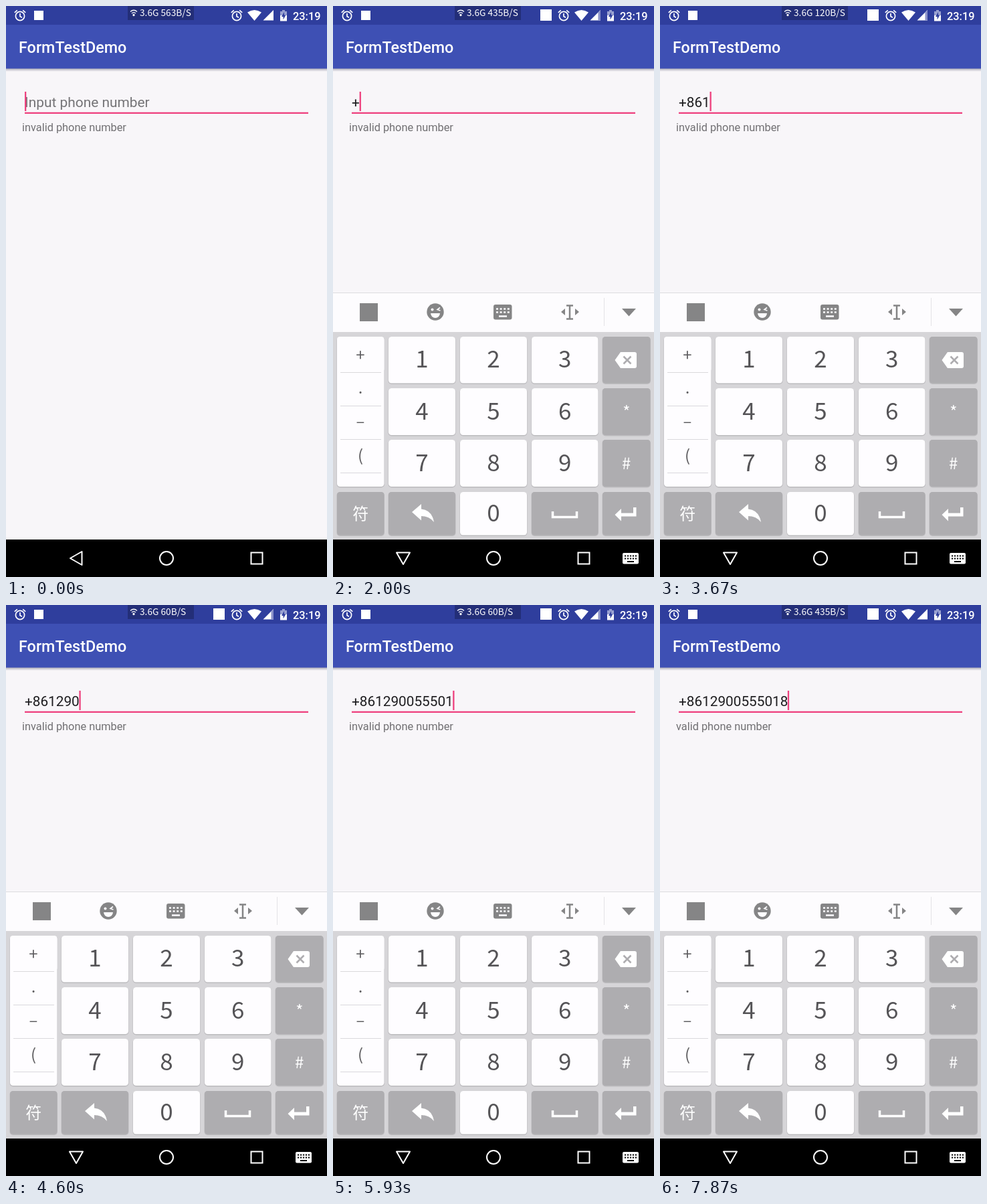
Recreate the animation shown at these times as an HTML page. Size 480 by 853 pixels, loop 8000 ms.

```html
<!DOCTYPE html>
<html lang="en">
<head>
<meta charset="utf-8">
<title>Phone number form</title>
<style>
  html, body { margin: 0; width: 100%; height: 100%; overflow: hidden; background: #000; }
  svg { display: block; width: 100%; height: 100%; font-family: Roboto, sans-serif; }
  .cjk { font-family: "Noto Sans CJK SC", "Noto Sans CJK JP", "Noto Sans CJK", "Noto Sans", sans-serif; }
  .white { fill: #fff; }
  .line { fill: none; stroke: #fff; stroke-width: 2; }
  .accent { fill: #ee427f; }
  .icon { fill: #858586; }
  .shade { fill: #bcbbbe; }
  .light { fill: #fefdff; }
  .light.down { fill: #e2e1e4; }
  .gray { fill: #aeadb0; }
  .gray.down { fill: #97969a; }
  .digit { font-size: 35px; fill: #555457; text-anchor: middle; }
  .sign { font-size: 24px; fill: #5e5d60; text-anchor: middle; }
  .sign.white { fill: #fff; }
</style>
</head>
<body>
<svg viewBox="0 0 480 853" preserveAspectRatio="none">
  <defs>
    <linearGradient id="shadow" x2="0" y2="1">
      <stop stop-color="#a9a8b4"/><stop offset="1" stop-color="#f8f6f9"/>
    </linearGradient>
    <g id="alarm" fill="none" stroke="#fff" stroke-width="1.7">
      <circle cy="1" r="6.6"/>
      <path d="M0-3V1.5L3 3.3M-8.2-4.2L-4.2-7.6M8.2-4.2L4.2-7.6"/>
    </g>
  </defs>

  <rect width="480" height="853" fill="#f8f6f9"/>
  <rect y="93" width="480" height="5" fill="url(#shadow)"/>
  <rect y="28" width="480" height="65.5" fill="#3e50b4"/>
  <rect width="480" height="28" fill="#2f3e9d"/>
  <text x="19" y="70" font-size="23.35" font-weight="500" class="white">FormTestDemo</text>

  <!-- status bar -->
  <use href="#alarm" x="21" y="14"/>
  <rect x="42" y="7" width="14" height="14" fill="#fff"/>
  <rect x="182" width="99" height="21" fill="#232e78"/>
  <g fill="none" stroke="#fff" stroke-width="1.3">
    <path d="M186 8.5Q191 4 196 8.5M188 11Q191 8.3 194 11"/>
    <circle cx="191" cy="13.5" r="1"/>
  </g>
  <text id="speed" x="200" y="15" font-size="13.7" class="cjk white"></text>
  <rect id="imeMark" x="310" y="5" width="17" height="17" fill="#fff"/>
  <use href="#alarm" x="345" y="14"/>
  <path class="white" d="M361 9.5Q371.500 2.500 382 9.500L371.500 22Z"/>
  <path class="white" d="M384.500 21.500L400 6V21.500Z"/>
  <path id="weak" fill="#8a92c9" d="M396.500 9.500L400 6V21.500H396.500Z"/>
  <path fill="#98a0d0" d="M410 8H413V6H417V8H420V15H410Z"/>
  <path class="white" d="M410 14H420V22.500H410Z"/>
  <path fill="#2f3e9d" d="M416 9L412 16H414.600V20.500L418.400 13.500H416Z"/>
  <text x="429" y="20.500" font-size="16.35" font-weight="500" class="white">23:19</text>

  <!-- form -->
  <text id="hint" x="28" y="151" font-size="20.9" fill="#757477">Input phone number</text>
  <text id="value" x="28" y="151" font-size="20.75" fill="#1f1e21"></text>
  <rect id="cursor" class="accent" y="128" width="2.3" height="29"/>
  <rect class="accent" x="28" y="158.700" width="424" height="2.300"/>
  <text id="status" x="24" y="187" font-size="16.35" fill="#717073"></text>

  <!-- soft keyboard -->
  <g id="keyboard">
    <rect y="428" width="480" height="369" fill="#d6d5d8"/>
    <rect y="428" width="480" height="59" fill="#fdfcfe"/>
    <rect y="428" width="480" height="1" fill="#dddcdf"/>
    <g class="icon">
      <rect x="40" y="444" width="27" height="27"/>
      <circle cx="153" cy="457" r="12.700"/>
      <rect x="240" y="446" width="27.500" height="22.500" rx="3"/>
      <path d="M432 452H453L442.500 463.500Z"/>
      <path d="M341 457L347 452V462ZM368 457L362 452V462Z"/>
    </g>
    <path d="M349 447.500H359M349 467.500H359M354 447.500V467.500" fill="none" stroke="#858586" stroke-width="2.500"/>
    <circle cx="148.500" cy="453.500" r="2" class="light"/>
    <path d="M146 459H160Q159 466 153 466T146 459Z" class="light"/>
    <path d="M160 450.500L156 453.500L160.500 455" fill="none" stroke="#fefdff" stroke-width="1.600"/>
    <path d="M244 452.500H264M244 457.500H264" stroke="#fefdff" stroke-width="2.500" stroke-dasharray="3 2.600"/>
    <path d="M248 463.500H260" stroke="#fefdff" stroke-width="2.500"/>
    <path d="M405.500 436V478" stroke="#e4e3e6"/>
    <g id="keys"></g>
    <path d="M11 547.500H72M11 597.500H72M11 647.500H72M11 697.500H72" stroke="#dad9dc"/>
    <path class="white" d="M421.500 529L430 517H451Q454 517 454 520V538Q454 541 451 541H430Z"/>
    <path d="M434.500 523.500L445.500 534.500M445.500 523.500L434.500 534.500" stroke="#aeadb0" stroke-width="2.600"/>
    <path class="white" d="M118 756L132 744V751.500Q148 753 151 771Q144 762 132 762V768.500Z"/>
    <path d="M328.500 755V763.500H364.500V755" fill="none" stroke="#fff" stroke-width="3.500"/>
    <path class="white" d="M421.500 760L431 751V757.500H449V749H453.500V762.500H431V769.500Z"/>
  </g>

  <!-- navigation bar -->
  <rect y="797" width="480" height="56" fill="#000"/>
  <path id="back" class="line" d="M96 825L113.500 815V835Z" stroke-linejoin="round"/>
  <circle class="line" cx="240" cy="825" r="10"/>
  <rect class="line" x="366.500" y="816.500" width="17" height="17"/>
  <g id="imeSwitch">
    <rect class="white" x="433" y="817" width="24" height="16.500" rx="2"/>
    <path d="M436 821.500H454M436 825.500H454" stroke="#000" stroke-width="2.200" stroke-dasharray="2.200 1.750"/>
    <path d="M440 830H450" stroke="#000" stroke-width="2"/>
  </g>
</svg>
<script>
const LOOP = 8000;
const CHAR_WIDTH = 11.63;
const VALID_LENGTH = 14;
const columns = [[6, 70.5], [83, 100], [190, 100], [297, 99.5], [403, 71.5]];
const rows = [[494, 69.5], [571, 70], [648, 70], [726, 64.5]];

// pressed at, released at, key
const strokes = [
  [1860, 1990, '+'], [2390, 2520, '8'], [2590, 2720, '6'], [3260, 3320, '1'],
  [3790, 3860, '2'], [3920, 4060, '9'], [4520, 4590, '0'], [4660, 4790, '0'],
  [4990, 4990, '5'], [5190, 5320, '5'], [5390, 5460, '5'], [5590, 5720, '0'],
  [5860, 5925, '1'], [6190, 6260, '8'], [6860, 6960, 'delete'], [7720, 7860, '8']
];
const speeds = [[0, 563], [590, 615], [1925, 435], [2590, 120], [4590, 60], [6260, 435]];

const $ = id => document.getElementById(id);
const keyCaps = {};

function add(tag, attrs, text = '') {
  const node = document.createElementNS('http://www.w3.org/2000/svg', tag);
  for (const name in attrs) node.setAttribute(name, attrs[name]);
  node.textContent = text;
  return $('keys').appendChild(node);
}

function cap(x, y, width, height, tone) {
  add('rect', { x: x - .5, y, width: width + 1, height: height + 1.5, rx: 5, class: 'shade' });
  return add('rect', { x, y, width, height, rx: 4.5, class: tone });
}

function key(name, col, row, tone, label, style) {
  const [x, w] = columns[col], [y, h] = rows[row];
  keyCaps[name] = cap(x, y, w, h, tone);
  const drop = style === 'digit' ? 11.5 : 9;
  add('text', { x: x + w / 2, y: y + h / 2 + drop, class: 'cjk ' + style }, label);
}

function buildKeys() {
  cap(6, 494, 70.5, 224, 'light');
  keyCaps['+'] = add('rect', { x: 6, y: 494, width: 70.5, height: 53, rx: 4.5, class: 'light' });
  [['+', 530], ['.', 579], ['–', 629], ['(', 680]].forEach(([label, y]) =>
    add('text', { x: 41, y, class: 'cjk sign' }, label));
  for (let n = 1; n <= 9; n++) key(n, 1 + (n - 1) % 3, Math.floor((n - 1) / 3), 'light', n, 'digit');
  key(0, 2, 3, 'light', 0, 'digit');
  key('delete', 4, 0, 'gray', '', 'sign white');
  key('*', 4, 1, 'gray', '*', 'sign white');
  key('#', 4, 2, 'gray', '#', 'sign white');
  key('symbols', 0, 3, 'gray', '符', 'sign white');
  key('return', 1, 3, 'gray', '', 'sign white');
  key('space', 3, 3, 'gray', '', 'sign white');
  key('enter', 4, 3, 'gray', '', 'sign white');
}

const show = (id, on) => $(id).setAttribute('visibility', on ? 'visible' : 'hidden');
const easeOut = p => 1 - (1 - Math.min(1, Math.max(0, p))) ** 2;

function render(t) {
  let value = '', edited = 100, held = null;
  for (const [down, up, name] of strokes) {
    if (t >= up) {
      value = name === 'delete' ? value.slice(0, -1) : value + name;
      edited = up;
    } else if (t >= down) held = name;
  }
  for (const name in keyCaps) keyCaps[name].classList.toggle('down', name === held);

  $('value').textContent = value;
  show('hint', !value);
  $('status').textContent = (value.length === VALID_LENGTH ? '' : 'in') + 'valid phone number';
  $('cursor').setAttribute('x', 28 + value.length * CHAR_WIDTH);
  show('cursor', Math.max(0, t - edited) % 1000 < 500);

  const rate = speeds.filter(([start]) => t >= start).pop()[1];
  $('speed').textContent = `3.6G ${rate}B/S`;
  show('imeMark', t >= 1060);
  show('weak', t >= 1590 && t < 6260);

  const rise = easeOut((t - 300) / 300);
  $('keyboard').setAttribute('opacity', rise);
  $('keyboard').setAttribute('transform', `translate(0 ${37 * (1 - rise)})`);
  $('back').setAttribute('transform', `rotate(${-90 * rise} 105 825)`);
  show('imeSwitch', rise > 0);
}

buildKeys();
const start = performance.now();
function tick() {
  render((performance.now() - start) % LOOP);
  requestAnimationFrame(tick);
}
tick();
</script>
</body>
</html>
```
